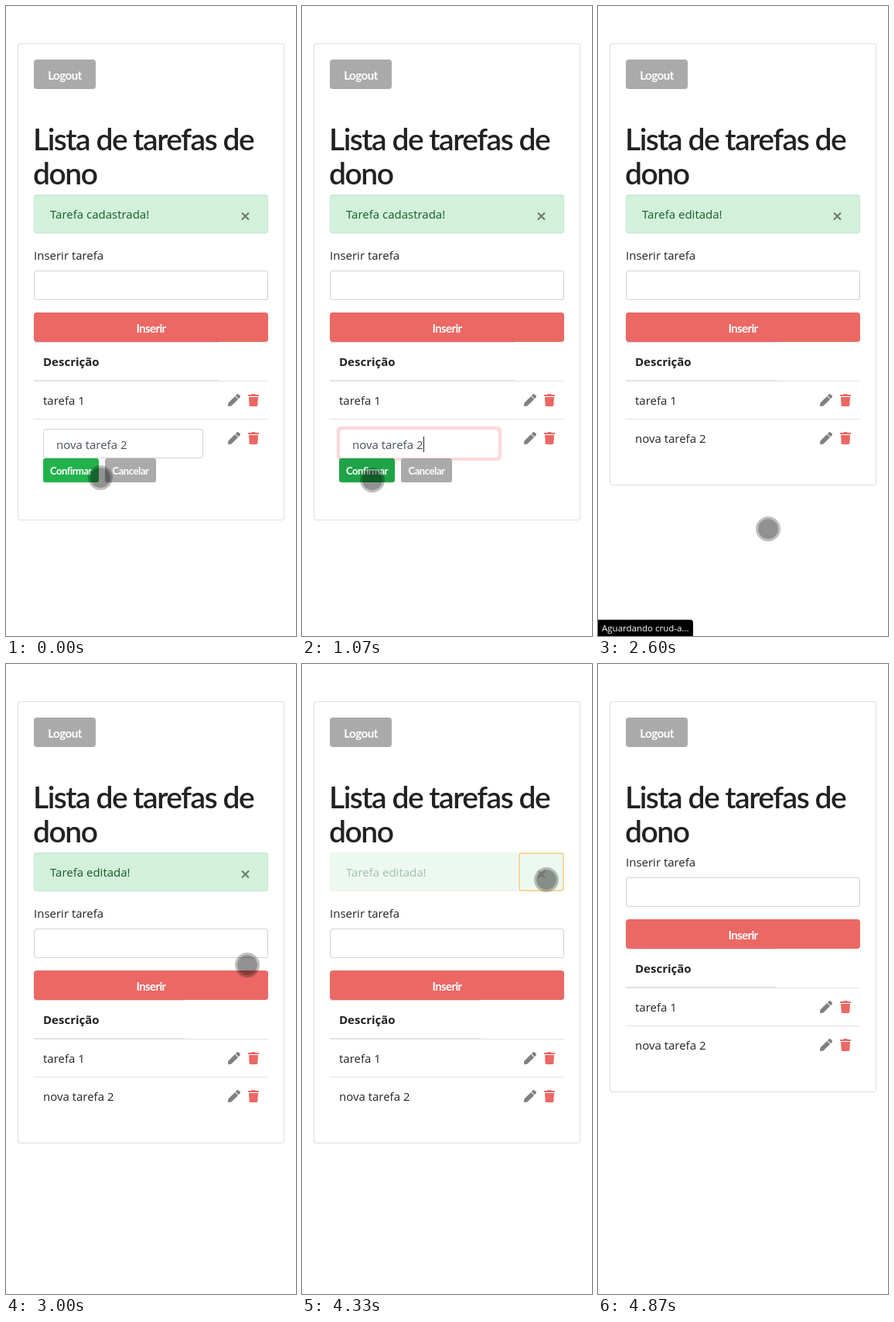
Write an HTML page with a canvas that moves like this. It is 375 px wide and 812 px high and loops after 5.99 s.

```html
<!DOCTYPE html>
<html lang="pt">
<head>
<meta charset="utf-8">
<title>Lista de tarefas</title>
<style>
html, body { margin: 0; width: 100%; height: 100%; overflow: hidden; background: #fff; }
canvas { display: block; width: 375px; height: 812px; }
</style>
</head>
<body>
<canvas id="stage"></canvas>
<script>
const W = 375, H = 812, LOOP = 5990, FPS = 15;
const canvas = document.getElementById('stage');
const ctx = canvas.getContext('2d');
const dpr = window.devicePixelRatio || 1;
canvas.width = W * dpr;
canvas.height = H * dpr;

const BODY = '"Open Sans", "Noto Sans", sans-serif';
const TITLE = 'Lato, "Open Sans", sans-serif';
const RED = '#eb6864', GRAY = '#aaa', INK = '#222', RULE = '#dee2e6', FIELD = '#ced4da';

const PEN = new Path2D('M291 93L419 221 141 499 27 512C11 514-2 501 0 485L13 371ZM498 74L438 14C419-5 389-5 370 14L313 71 441 199 498 142C517 123 517 93 498 74Z');
const TRASH = new Path2D('M432 32H312L303 13A24 24 0 0 0 281 0H167A24 24 0 0 0 145 13L136 32H16A16 16 0 0 0 0 48V80A16 16 0 0 0 16 96H432A16 16 0 0 0 448 80V48A16 16 0 0 0 432 32ZM53 467A48 48 0 0 0 101 512H347A48 48 0 0 0 395 467L416 128H32Z');

// Pointer path: time, x, y
const PATH = [
  [0, 122, 608], [267, 92, 613], [400, 92, 613], [533, 91, 612], [667, 91, 612],
  [733, 93, 611], [800, 93, 611], [1067, 91, 611], [1533, 91, 611], [1867, 167, 665],
  [2133, 213, 677], [2533, 213, 677], [2600, 220, 674], [2867, 285, 480], [3133, 338, 295],
  [3533, 313, 277], [3733, 313, 277], [3933, 316, 278], [4333, 316, 278], [4400, 326, 295],
  [4467, 350, 350], [4533, 362, 430], [4600, 350, 520], [4667, 310, 610], [4733, 243, 699],
  [4800, 167, 787]
];
const POINTER_END = 4850;

const ramp = (t, start, length = 150) => Math.min(1, Math.max(0, (t - start) / length));

function mix(a, b, k) {
  return `rgb(${a.map((v, i) => Math.round(v + (b[i] - v) * k))})`;
}

function pointerAt(t) {
  const i = PATH.findIndex(p => p[0] > t);
  if (i < 0) return PATH[PATH.length - 1].slice(1);
  const [t0, x0, y0] = PATH[i - 1], [t1, x1, y1] = PATH[i];
  const k = (t - t0) / (t1 - t0);
  return [Math.round(x0 + (x1 - x0) * k), Math.round(y0 + (y1 - y0) * k)];
}

function text(str, x, y, { size = 15, weight = 400, family = BODY, color = INK, spacing = 0, align = 'left' } = {}) {
  ctx.font = `${weight} ${size}px ${family}`;
  ctx.letterSpacing = spacing + 'px';
  ctx.textAlign = align;
  ctx.fillStyle = color;
  ctx.fillText(str, x, y);
}

function box(x, y, w, h, r, fill, border) {
  ctx.beginPath();
  ctx.roundRect(x, y, w, h, r);
  ctx.fillStyle = border || fill;
  ctx.fill();
  if (!border) return;
  ctx.beginPath();
  ctx.roundRect(x + 1, y + 1, w - 2, h - 2, r - 1);
  ctx.fillStyle = fill;
  ctx.fill();
}

function rule(x0, x1, y, h = 1) {
  ctx.fillStyle = RULE;
  ctx.fillRect(x0, y, x1 - x0, h);
}

function ring(x, y, w, h, color, alpha) {
  ctx.save();
  ctx.globalAlpha = alpha;
  box(x - 3.2, y - 3.2, w + 6.4, h + 6.4, 6, color);
  ctx.restore();
}

function button(label, x, y, w, h, color, size, spacing) {
  box(x, y, w, h, h > 35 ? 4 : 3, color);
  text(label, x + w / 2, y + h / 2 + size * 0.44,
    { size, weight: 700, family: TITLE, color: '#fff', spacing, align: 'center' });
}

function icon(path, x, y, color) {
  ctx.save();
  ctx.translate(x, y);
  ctx.scale(1 / 32, 1 / 32);
  ctx.fillStyle = color;
  ctx.fill(path);
  ctx.restore();
}

function rowIcons(y) {
  icon(PEN, 287, y, '#808080');
  icon(TRASH, 313, y, RED);
}

function alertBox(message, t) {
  box(36, 243, 303, 50, 4, '#d3f0db', '#c1e9cd');
  text(message, 57, 274, { color: '#125d28' });
  ctx.strokeStyle = 'rgba(0,0,0,.48)';
  ctx.lineWidth = 2.2;
  ctx.beginPath();
  ctx.moveTo(305, 266.5); ctx.lineTo(314, 275.5);
  ctx.moveTo(314, 266.5); ctx.lineTo(305, 275.5);
  ctx.stroke();
  if (t >= 4190) {
    ctx.fillStyle = '#fff';
    ctx.fillRect(279, 244, 1, 48);
    ctx.strokeStyle = '#e59700';
    ctx.lineWidth = 2;
    ctx.beginPath();
    ctx.roundRect(281, 244, 57, 48, 3);
    ctx.stroke();
  }
  // Fading the whole group equals covering it with white
  ctx.fillStyle = `rgba(255,255,255,${ramp(t, 4243)})`;
  ctx.fillRect(36, 243, 303, 50);
}

function editRow(t) {
  const inputFocus = ramp(t, 820) * (1 - ramp(t, 1100));
  ring(48, 545, 207, 38, '#fad9d8', inputFocus);
  box(48, 545, 207, 38, 4, '#fff', mix([206, 212, 218], [250, 217, 216], inputFocus));
  text('nova tarefa 2', 65, 571, { color: '#495057' });
  if (t > 860 && t < 1120) {
    ctx.fillStyle = INK;
    ctx.fillRect(157, 555, 1, 20);
  }
  ring(48, 583, 72, 31, '#a1dfb3', ramp(t, 1150));
  button('Confirmar', 48, 583, 72, 31, mix([34, 178, 76], [28, 149, 64], ramp(t, 990)), 13, -0.5);
  button('Cancelar', 128, 583, 66, 31, GRAY, 13, -0.4);
}

function tasks(t, editing) {
  const headEnd = editing ? 275 : 231;
  text('Inserir tarefa', 36, 327);
  box(36, 341, 303, 38, 4, '#fff', FIELD);
  rule(36, headEnd, 433);
  button('Inserir', 36, 395, 303, 38, RED, 15, -0.6);
  text('Descrição', 48, 464, { weight: 700 });
  rule(36, headEnd, 482, 2);
  rule(headEnd, 339, 483);
  text('tarefa 1', 48, 514);
  rowIcons(500);
  rule(36, 339, 532);
  rowIcons(549);
  if (editing) editRow(t);
  else text('nova tarefa 2', 48, 563);
}

function pointer(t) {
  const [x, y] = pointerAt(t);
  const disc = (r, color, hole) => {
    ctx.beginPath();
    ctx.arc(x, y, r, 0, Math.PI * 2);
    if (hole) ctx.arc(x, y, hole, 0, Math.PI * 2, true);
    ctx.fillStyle = color;
    ctx.fill();
  };
  disc(16, 'rgba(0,0,0,.25)', 13);
  disc(13, 'rgba(0,0,0,.43)');
}

function draw(t) {
  const editing = t < 2320;
  const lift = t >= 4390 ? 66 : 0;
  ctx.setTransform(dpr, 0, 0, dpr, 0, 0);
  ctx.fillStyle = '#fff';
  ctx.fillRect(0, 0, W, H);

  box(15, 48, 345, (editing ? 615 : 570) - lift, 4, '#fff', '#dfdfdf');
  button('Logout', 36, 69, 80, 38, GRAY, 15, -0.45);
  const heading = { size: 39, weight: 600, family: TITLE, spacing: -1.5 };
  text('Lista de tarefas de', 35, 186, heading);
  text('dono', 35, 230, heading);

  if (!lift) alertBox(editing ? 'Tarefa cadastrada!' : 'Tarefa editada!', t);
  ctx.save();
  ctx.translate(0, -lift);
  tasks(t, editing);
  ctx.restore();

  if (t >= 1590 && t < 2730) {
    box(0, 791, 123, 21, [0, 4, 0, 0], '#000');
    text('Aguardando crud-a...', 5, 806, { size: 11.5, color: '#fff' });
  }
  if (t < POINTER_END) pointer(t);
}

function tick() {
  const now = performance.now() % LOOP;
  draw(Math.floor((now + 5) * FPS / 1000) * 1000 / FPS);
  requestAnimationFrame(tick);
}
tick();
</script>
</body>
</html>
```
